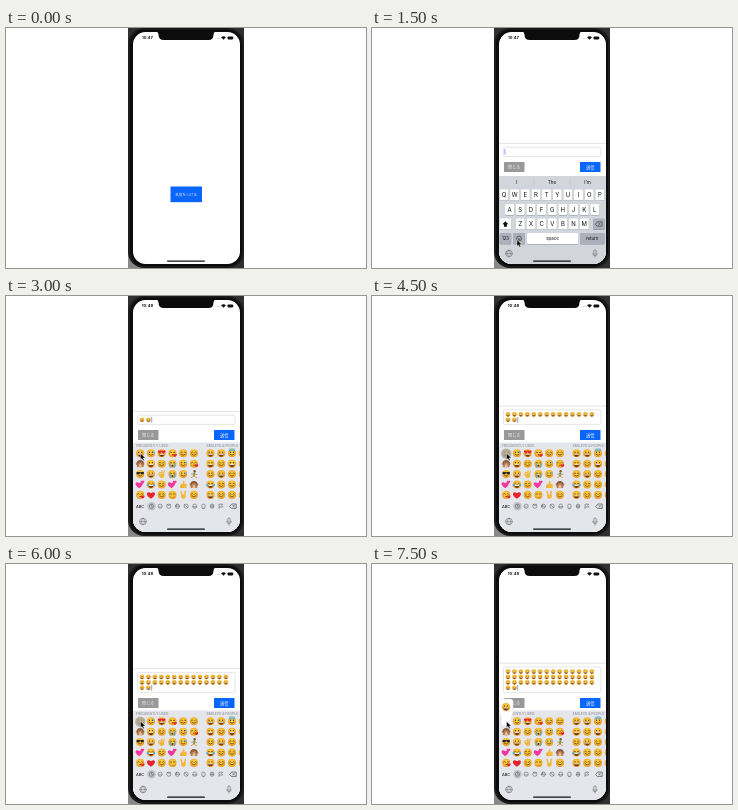
Write an HTML page that moves like this. It is 360x240 px and loops after 8000 ms.

```html
<!DOCTYPE html>
<html lang="ja">
<head>
<meta charset="utf-8">
<style>
html, body { margin: 0; overflow: hidden; background: #fff }
svg { display: block; width: 100vw; height: 100vh }
text { font-family: Inter, "Noto Sans CJK JP", "Noto Sans CJK", sans-serif }
</style>
</head>
<body>
<svg viewBox="0 0 360 240">
  <defs>
    <clipPath id="screen"><rect x="127" y="4" width="107" height="232" rx="12.5"/></clipPath>
    <radialGradient id="skin" cy=".4"><stop offset=".4" stop-color="#fccb3c"/><stop offset="1" stop-color="#e9a32a"/></radialGradient>
  </defs>
  <g id="view"></g>
</svg>
<script>
const STEP = 500, STEPS = 16, PER_ROW = 14, ROW = 5.4;
const BLUE = '#0a66fa', GREY = '#999', LINE = '#dcdcdc';
const view = document.getElementById('view');

const rect = (x, y, w, h, fill, r = 0, more = '') =>
  `<rect x="${x}" y="${y}" width="${w}" height="${h}" rx="${r}" fill="${fill}" ${more}/>`;
const circle = (x, y, r, fill, more = '') => `<circle cx="${x}" cy="${y}" r="${r}" fill="${fill}" ${more}/>`;
const path = (d, fill, stroke = 'none', w = 1) =>
  `<path d="${d}" fill="${fill}" stroke="${stroke}" stroke-width="${w}" stroke-linecap="round"/>`;
const text = (x, y, s, size, fill = '#111', anchor = 'middle', weight = 400) =>
  `<text x="${x}" y="${y}" font-size="${size}" fill="${fill}" text-anchor="${anchor}" font-weight="${weight}">${s}</text>`;

// Emoji, each drawn around 0,0 in a 10-unit box
const head = circle(0, 0, 4.7, 'url(#skin)');
const dots = circle(-1.7, -1.2, .75, '#5b3510') + circle(1.7, -1.2, .75, '#5b3510');
const smile = path('M-2.3 1.2Q0 3.6 2.3 1.2', 'none', '#5b3510', .8);
const laugh = path('M-3 .6H3Q2.5 4 0 4T-3 .6', '#70380f') + rect(-2.5, .6, 5, 1, '#fff');
const squint = path('M-2.9 -.9Q-1.8 -2.4 -.8 -.9M.8 -.9Q1.8 -2.4 2.9 -.9', 'none', '#5b3510', .8);
const heart = (x, y, k, fill) =>
  `<g transform="translate(${x} ${y}) scale(${k})">${path('M0 4C-8 -1 -4 -6 0 -2.5C4 -6 8 -1 0 4', fill)}</g>`;
const monkey = circle(-3.9, 0, 1.4, '#d9a679') + circle(3.9, 0, 1.4, '#d9a679') + circle(0, 0, 4.2, '#8a5a3c') +
  circle(0, 1.8, 2.6, '#e8c096') + path('M-3 3L-1.2 -.8M3 3L1.2 -.8', 'none', '#b57d52', 2);
const palm = path('M-2.5 0L2.8 -.8L3 3Q0 6 -2.5 3Z', '#f3b93b');
const emoji = {
  g: head + dots + laugh,
  b: head + squint + smile,
  l: head + squint + laugh + circle(-3.8, .8, 1.3, '#4daee9') + circle(3.8, .8, 1.3, '#4daee9'),
  t: head + dots + smile + circle(3.3, -1.2, 1.1, '#62b9ea'),
  c: head + squint + path('M-2.4 .2V4M2.4 .2V4', 'none', '#4daee9', 1.4) + circle(0, 2.3, 1.2, '#70380f'),
  h: head + heart(-2.1, -1.4, .5, '#e8242d') + heart(2.1, -1.4, .5, '#e8242d') + laugh,
  k: head + squint + circle(0, 1.8, .8, '#70380f') + heart(3, 2.4, .45, '#e8242d'),
  s: head + rect(-4.2, -2.4, 3.8, 2.7, '#222', 1) + rect(.4, -2.4, 3.8, 2.7, '#222', 1) + rect(-4, -2.4, 8, .8, '#222') + smile,
  a: head + dots + smile + `<ellipse cy="-4" rx="3.6" ry="1.1" fill="none" stroke="#42abe0"/>`,
  w: head + squint + path('M-1 2.6L3 1.8L2 4.8Z', '#d9912c'),
  m: monkey,
  o: palm + circle(-1.7, 0, 1.8, 'none', 'stroke="#f3b331" stroke-width="1.2"') +
    path('M.3 0V-4M2 0L3 -3.5', 'none', '#f3b93b', 1.4),
  u: path('M-1.5 4V0L.3 -4.4Q2 -4.5 1.3 -1H4V4Z', '#f3b93b') + rect(-3.5, 0, 2.2, 4, '#eeac2c', .6),
  v: palm + path('M-1.2 1L-2.5 -4M1.4 1L2.5 -4', 'none', '#f3b93b', 1.7),
  r: circle(.8, -3.3, 1.4, '#8a5832') + path('M.5 -1L0 1.5', 'none', '#36a06e', 2.4) +
    path('M0 2L3 4.2M0 2L-3 4M-2.8 0L3.4 .4', 'none', '#d79b48', 1.1),
  H: heart(-1.2, .8, .9, '#f3379e') + heart(2.7, -2.8, .45, '#f3379e'),
  L: heart(0, .5, 1, '#e9222c')
};
const put = (kind, x, y, d) => `<g transform="translate(${x} ${y}) scale(${d / 10})">${emoji[kind]}</g>`;

const backspace = (x, y) =>
  path(`M${x - 3.2} ${y}l2 -2.2h4.4v4.4h-4.4Z`, 'none', '#333', .6) +
  path(`M${x - .2} ${y - .8}l1.6 1.6m0 -1.6l-1.6 1.6`, 'none', '#333', .5);

function footer() {
  return circle(137, 225.5, 3.3, 'none', 'stroke="#666" stroke-width=".6"') +
    path('M133.7 225.5h6.6M137 222.2q-3.2 3.3 0 6.6q3.2 -3.3 0 -6.6', 'none', '#666', .5) +
    rect(221.9, 221.8, 2.2, 4.6, 'none', 1.1, 'stroke="#666" stroke-width=".6"') +
    path('M220.7 225.3q.3 2.5 2.3 2.5t2.3 -2.5M223 227.8v1.4', 'none', '#666', .6);
}

function letters() {
  const key = (x, y, w, fill = '#fff') => rect(x, y + .5, w, 11, '#8e9299', 1.3) + rect(x, y, w, 11, fill, 1.3);
  const dark = '#abb0ba';
  let out = rect(126, 148, 109, 90, '#d2d5db') + path('M162 151v6M198 151v6', 'none', '#b9bcc3', .4);
  [['I', 144.5], ['The', 180], ['I’m', 215.5]].forEach(([s, x]) => out += text(x, 156, s, 4.6));
  ['QWERTYUIOP', 'ASDFGHJKL', 'ZXCVBNM'].forEach((row, r) => [...row].forEach((c, i) => {
    const x = [132, 137.6, 148.3][r] + i * 10.65, y = 161.5 + r * 14.5;
    out += key(x - 4.5, y, 9) + text(x, y + 7.7, c, 6);
  }));
  out += key(127.7, 190.5, 11.5) + path('M133.4 193.3l3 3h-1.5v2.5h-3v-2.5h-1.5Z', '#111') +
    key(221, 190.5, 11.5, dark) + backspace(226.8, 196) +
    key(127.7, 205, 11.5, dark) + text(133.4, 212.2, '123', 4.2) +
    key(141, 205, 12, dark) + circle(147, 210.5, 2.4, 'none', 'stroke="#222" stroke-width=".6"') +
    path('M145.6 210.8q1.4 1.8 2.8 0', '#222') +
    key(155, 205, 51) + text(180.5, 212.1, 'space', 4.4) +
    key(208, 205, 24.5, dark) + text(220.2, 212.1, 'return', 4.4);
  return out + footer();
}

function emojiBoard() {
  const rows = ['gthkbbggag', 'mgbctkgbgb', 'sgoctrbgbg', 'HlbHumlbbg', 'kLbwvbgbbg'];
  let out = rect(126, 146.5, 109, 92, '#e4e6eb') +
    text(130, 151.3, 'FREQUENTLY USED', 3.4, '#92959c', 'start', 500) +
    text(200.5, 151.3, 'SMILEYS &amp; PEOPLE', 3.4, '#92959c', 'start', 500);
  rows.forEach((row, r) => [...row].forEach((k, i) =>
    out += put(k, i < 6 ? 134.2 + i * 10.75 : 204.5 + (i - 6) * 10.75, 157.3 + r * 10.4, 8.6)));
  out += text(134, 211.6, 'ABC', 3.9, '#222', 'middle', 500) + circle(145.5, 210.2, 4.2, '#bfc2c8');
  const icons = ['M0 -1.3V0L1 .6', 'M-1 .5Q0 1.6 1 .5', 'M-1.7 -2L-.8 -1H.8L1.7 -2', 'M-2 0H2M-.8 -2V0',
    'M-1.7 -1.5L1.7 1.5', 'M-2.2 .6H2.2', 'M-.7 2.4H.7', 'M-1.5 0H1.5M0 -1.5V1.5', 'M-1.6 2.3V-2H2L1 -.6L2 .8H-1.6'];
  icons.forEach((d, i) => {
    const stroke = 'stroke="#666" stroke-width=".6"';
    const shape = i < 5 ? circle(0, 0, 2.1, 'none', stroke) : i < 8 ? rect(-1.6, -2, 3.2, 4, 'none', 1, stroke) : '';
    out += `<g transform="translate(${145.5 + i * 8.65} 210.2)">${shape}${path(d, 'none', '#666', .6)}</g>`;
  });
  return out + backspace(227, 210.2) + footer();
}

function composer(count, shift) {
  const lines = Math.max(1, Math.ceil(count / PER_ROW)), grow = (lines - 1) * ROW;
  const top = 119.2 - grow + shift, last = 123.8 + shift;
  let out = rect(126, top - 4.2, 109, 130, '#fff') + rect(126, top - 4.2, 109, .7, LINE) +
    rect(131.5, top, 97.5, 9.2 + grow, '#fff', 1, `stroke="${LINE}" stroke-width=".7"`);
  for (let i = 0; i < count; i++)
    out += put('g', 136 + i % PER_ROW * 6.45, last - (lines - 1 - Math.floor(i / PER_ROW)) * ROW, 5.1);
  const caret = count ? 139 + (count - 1) % PER_ROW * 6.45 : 132.6;
  return out + rect(caret, last - 2.8, .7, 5.6, '#4a7cf0') +
    rect(132, 134 + shift, 20.5, 10, GREY, .6) + text(142.2, 140.5 + shift, '閉じる', 4.1, '#eee') +
    rect(208, 134 + shift, 20.5, 10, BLUE, .6) + text(218.2, 140.5 + shift, '送信', 4.3, '#fff');
}

function phone(time, content) {
  return rect(122, 0, 116, 240, '#303030') + rect(122, 220, 20, 20, '#888') +
    rect(122, 0, 116, 240, '#1c1c1c', 16) + rect(124, 1.5, 112, 237, '#0c0c0c', 15) +
    `<g clip-path="url(#screen)">${rect(126, 3, 109, 234, '#fff')}${content}</g>` +
    path('M150 3.5Q152.5 4 152.5 6.5Q152.5 12 158 12H202.5Q207.500 12 207.5 6.5Q207.5 4 210 3.5Z', '#0c0c0c') +
    text(141.4, 11.4, time, 4.1, '#111', 'middle', 700) +
    [0, 1.3, 2.6, 3.9].map(d => circle(210 + d, 10.6, .45, '#999')).join('') +
    path('M217.5 11.8L215 9.2Q217.5 7.3 220 9.2Z', '#111') + rect(221.5, 8.5, 5.6, 2.9, '#111', .8) +
    rect(227.4, 9.4, .5, 1.2, '#777') + rect(161, 232.4, 38, 1.4, '#111', .7);
}

const pointer = (x, y) => path(`M${x} ${y}v6.2l1.5 -1.3l1 2.3l1.2 -.5l-1 -2.3h2Z`, '#000', '#fff', .4);

const popup = path('M130 135H138.5Q141 135 141 137V148Q141 150 139.5 152V160Q139.5 162 137.5 162H131' +
  'Q129 162 129 160V152Q127.5 150 127.5 148V137Q127.5 135 130 135Z', '#fff', '#d5d7db', .4) +
  put('g', 134, 143, 8.6);

function draw(step) {
  const count = step < 6 ? 0 : Math.floor(2 + (step - 6) * 14 / 3 + .01);
  let body, mouse;
  if (step < 2) {
    body = rect(164.5, 158.5, 31.5, 15.7, BLUE) + text(180.2, 167.8, '名前をつける', 3.7, '#dbe8ff');
    mouse = step ? [181, 167] : null;
  } else {
    body = composer(count, step == 2 ? 4.5 : 0) + (step < 4 ? letters() : emojiBoard());
    mouse = step == 2 ? [181, 167] : step < 5 ? [145, 212] : [134.5, 157.5];
  }
  if (step == 15) body += popup;
  else if (step > 6) body += circle(134.3, 157.8, 5.2, '#a6a79e', 'opacity=".78"');
  view.innerHTML = phone(step < 5 ? '10:47' : '10:48', body) + (mouse ? pointer(...mouse) : '');
}

let shown = -1;
function tick() {
  const step = Math.floor(performance.now() / STEP) % STEPS;
  if (step != shown) draw(shown = step);
  requestAnimationFrame(tick);
}
tick();
</script>
</body>
</html>
```
